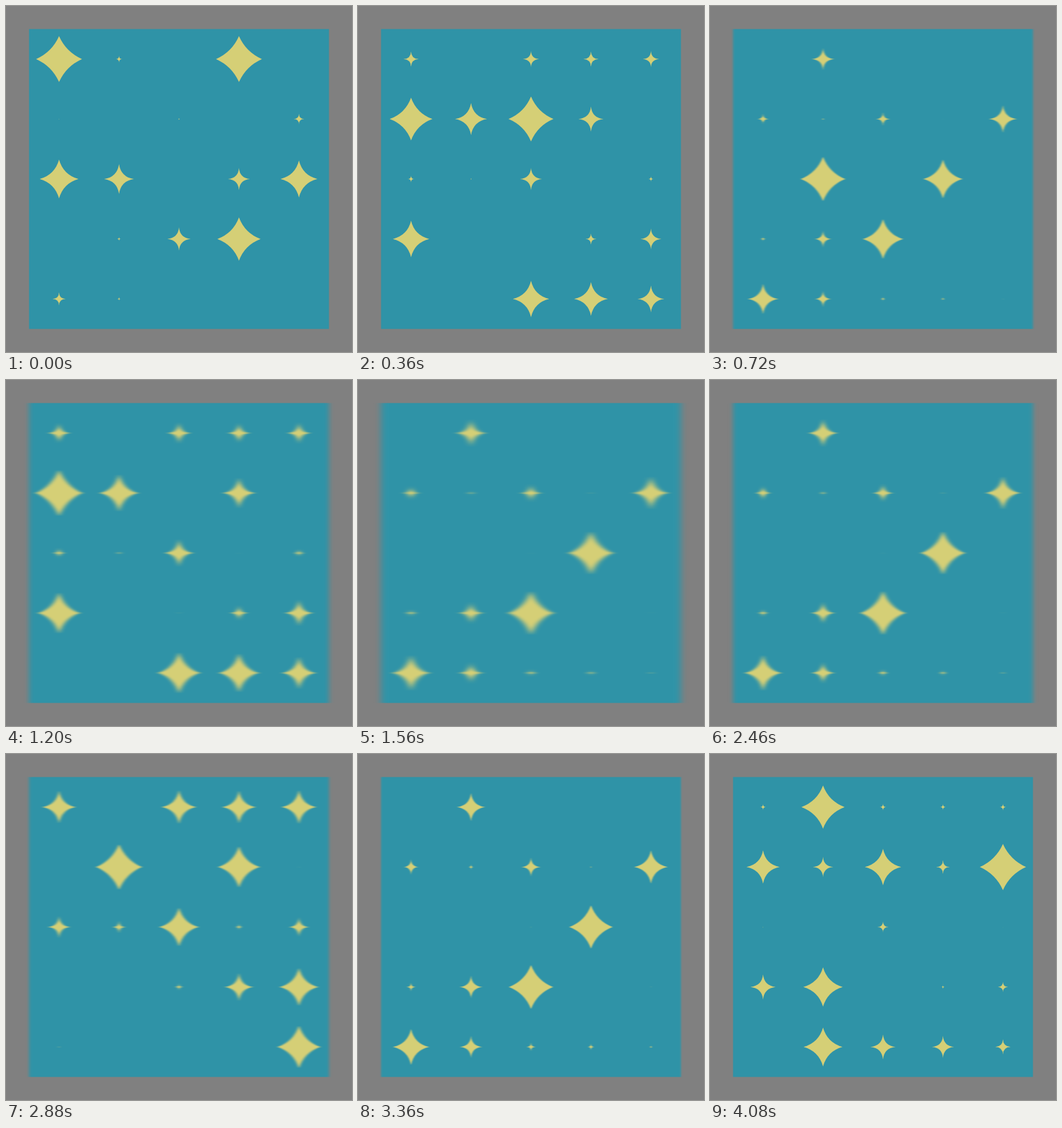
These frames come from a looping animation (500 px wide and 500 px high, 4.18 s). An HTML page:

```html
<!DOCTYPE html>
<html lang="en">
<head>
<meta charset="utf-8">
<title>Twinkling stars</title>
<style>
  html, body { margin: 0; width: 100%; height: 100%; overflow: hidden; background: #808080; }
  svg { display: block; width: 500px; height: 500px; }
</style>
</head>
<body>
<svg viewBox="0 0 500 500">
  <filter id="smear" filterUnits="userSpaceOnUse" x="0" y="0" width="500" height="500" color-interpolation-filters="sRGB">
    <feGaussianBlur id="blur" stdDeviation="1 0"/>
  </filter>
  <g id="scene">
    <rect x="33.33" y="33.33" width="433.34" height="433.34" fill="#2f93a7"/>
    <path id="stars" fill="#d5cf76"/>
  </g>
</svg>
<script>
const STEP = 60, LAST = 68, LOOP = 4180;
const CYCLE = 15;                 // steps between two appearances of a star
const BIRTH = 1.95, END = 13;     // ages at which a star pops up and has shrunk away
const PEAK = 35.4, FULL = 100 / 3, CELL = 260 / 3;
const BLUR = 5, BLUR_PEAK = 30, BLUR_END = 63;

// Each star's age in steps when the loop starts, row by row
const ages = [
  [2.1, 9.9, 1.9, 2.1, 1.9],
  [12, 14.2, 11.4, 0.4, 9],
  [3.9, 5.6, 0.9, 6.9, 4.3],
  [13.4, 10.8, 6.7, 2.9, 1.1],
  [8.5, 10.9, 13.4, 13.9, 0.1]
];

const scene = document.getElementById('scene');
const stars = document.getElementById('stars');
const blur = document.getElementById('blur');

const smooth = x => x * x * (3 - 2 * x);

// Eases in, then falls off evenly
function blurAt(step) {
  const level = step < BLUR_PEAK
    ? smooth(step / BLUR_PEAK)
    : (BLUR_END - step) / (BLUR_END - BLUR_PEAK);
  return BLUR * Math.max(0, level);
}

function sizeAt(age) {
  if (age < BIRTH || age > END) return 0;
  return PEAK * (1 + Math.cos(Math.PI * age / END)) / 2;
}

// Four points joined by inward curves; small stars are more pinched
function star(x, y, r) {
  const c = 0.31 * r * (r / FULL) ** 2;
  return `M${x} ${y - r}Q${x + c} ${y - c} ${x + r} ${y}` +
    `Q${x + c} ${y + c} ${x} ${y + r}` +
    `Q${x - c} ${y + c} ${x - r} ${y}` +
    `Q${x - c} ${y - c} ${x} ${y - r}Z`;
}

function draw(step) {
  let path = '';
  ages.forEach((line, row) => line.forEach((age, col) => {
    const r = sizeAt((age + step) % CYCLE);
    if (r > 0) path += star(250 + (col - 2) * CELL, 250 + (row - 2) * CELL, r);
  }));
  stars.setAttribute('d', path);

  const s = blurAt(step);
  blur.setAttribute('stdDeviation', `${s} 0`);
  if (s > 0) scene.setAttribute('filter', 'url(#smear)');
  else scene.removeAttribute('filter');
}

const start = performance.now();
function tick() {
  const t = (performance.now() - start) % LOOP;
  draw(Math.min(LAST, Math.floor(t / STEP)));
  requestAnimationFrame(tick);
}
tick();
</script>
</body>
</html>
```
